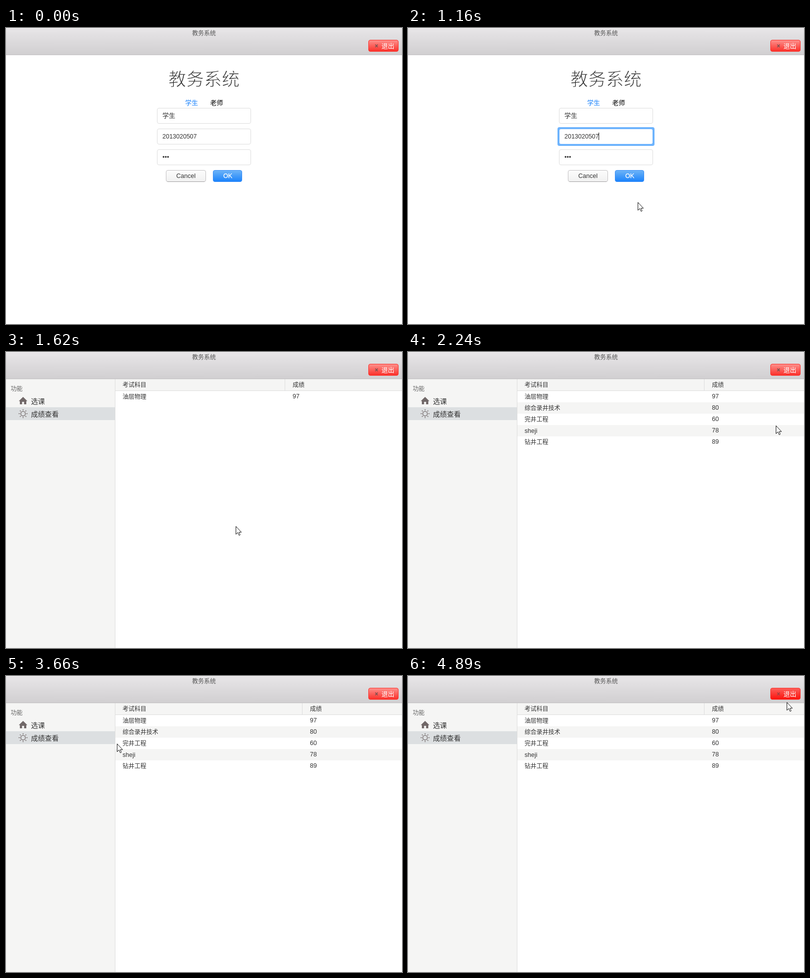
These frames come from a looping animation (800 px wide and 600 px high, 4970 ms). An HTML page:

```html
<!DOCTYPE html>
<html lang="zh-CN">
<head>
<meta charset="utf-8">
<style>
  html, body { margin: 0; width: 100%; height: 100%; overflow: hidden; background: #fff; }
  svg { display: block; width: 800px; height: 600px; }
  text { font-family: "Liberation Sans", "Noto Sans CJK SC", "Noto Sans CJK", sans-serif; font-size: 12px; fill: #333; }
  .medium { font-size: 13px; }
  .large { font-size: 14px; }
  .latin { font-size: 12.5px; }
  .white { fill: #fff; }
  .title { font-size: 36px; stroke: #fff; stroke-width: 1.1px; }
  .line { fill: none; stroke: #ddd; }
  .icon { fill: #716868; }
  .sun { fill: none; stroke: #716868; stroke-width: 1.4; }
</style>
</head>
<body>
<svg viewBox="0 0 800 600">
  <defs id="gradients"></defs>

  <g id="header">
    <rect width="800" height="54" fill="url(#bar)"/>
    <rect width="800" height="1" fill="#f5f4f5"/>
    <rect y="54" width="800" height="1" fill="#c2c0c2"/>
    <text x="400" y="14.5" text-anchor="middle" style="fill:#555">教务系统</text>
    <rect id="exit" x="732.5" y="24.5" width="60" height="23" rx="3.5" stroke="#fb2f29"/>
    <path id="cross" d="M746 33.5l5 5.5m0-5.5l-5 5.5" stroke-width="1.6"/>
    <text x="758.5" y="40.5" class="medium white">退出</text>
  </g>

  <g id="login">
    <text class="title" x="400" y="117" text-anchor="middle">教务系统</text>
    <text class="medium" x="362" y="155.5" style="fill:#1a82fb">学生</text>
    <text class="medium" x="412.5" y="155.5" style="fill:#000">老师</text>
    <g id="fields"></g>
    <g id="focus">
      <rect x="302" y="201" width="196" height="38" rx="4" fill="#6db3fd"/>
      <rect x="306" y="205" width="188" height="30" rx="3" fill="#fff"/>
      <path d="M385.5 212v15" stroke="#000"/>
    </g>
    <text class="medium" x="316" y="182">学生</text>
    <text class="latin" x="316" y="224">2013020507</text>
    <text class="medium" x="316" y="265.5">•••</text>
    <rect x="323.5" y="288.5" width="80" height="23" rx="3.5" fill="url(#plain)" stroke="#c2c0c2"/>
    <path d="M326 311.5h75" stroke="#a19fa1"/>
    <text class="latin" x="344" y="304">Cancel</text>
    <rect id="ok" x="418.5" y="288.5" width="58" height="23" rx="3.5" stroke="#388df8"/>
    <text class="latin white" x="439" y="304" stroke="#fff" stroke-width=".3">OK</text>
  </g>

  <g id="grades">
    <path d="M0 55h220v545H0zM221 55h579v23H221z" fill="#f5f5f4"/>
    <rect y="112" width="220" height="26" fill="#dcdfe1"/>
    <path class="line" d="M220.5 55v545M221 78.5h579"/>
    <text x="9.5" y="78.5" style="fill:#666">功能</text>
    <path class="icon" d="M34.5 91l8.7 8.5H41v6.5h-4.5v-5h-4v5H28v-6.5h-2.2z"/>
    <g class="sun" id="sun"><circle cx="34.5" cy="125" r="4.6"/></g>
    <text class="large" x="50.5" y="104.5">选课</text>
    <text class="large" x="50.5" y="130.5">成绩查看</text>
    <text x="235.5" y="70.5">考试科目</text>
    <g id="rows"></g>
    <g id="scores">
      <path class="line" d="M-15.5 55v23"/>
      <text y="70.5">成绩</text>
    </g>
  </g>

  <path id="cursor" d="M.5.5v16l3.7-3.6 2.5 5.6q1.6.4 2.4-1l-2.4-5.2h4.8z" fill="#fff" stroke="#111" stroke-linejoin="round"/>
</svg>
<script>
const LOOP = 4970, PRESS_OK = 850, RELEASE_OK = 1000, LOGIN_DONE = 1310,
      PAGE_OPEN = 1620, DATA_LOADED = 1700, PRESS_EXIT = 4800;
const TICK = 78; // cursor refresh interval, ms

const el = id => document.getElementById(id);
const show = (node, on) => node.style.display = on ? '' : 'none';

const gradients = {
  bar: ['#e8e6e8', '#d1cfd1'],
  plain: ['#fcfcfc', '#f1f1f1'],
  blue: ['#6eb4f7', '#1a82fb'],
  blueDown: ['#3e9bf4', '#0469de'],
  red: ['#fd918d', '#fb2f29'],
  redDown: ['#fc605b', '#fb120c'],
};
for (const [id, [top, bottom]] of Object.entries(gradients))
  el('gradients').innerHTML += `<linearGradient id="${id}" x2="0" y2="1">
    <stop stop-color="${top}"/><stop offset="1" stop-color="${bottom}"/></linearGradient>`;

for (let i = 0; i < 3; i++)
  el('fields').innerHTML += `<rect class="line" x="305.5" y="${162.5 + 42 * i}" width="189" height="31" rx="3.5"/>`;

for (let a = 0; a < 360; a += 45)
  el('sun').innerHTML += `<path d="M34.5 116v2.4" transform="rotate(${a} 34.5 125)"/>`;

const grades = { 油层物理: 97, 综合录井技术: 80, 完井工程: 60, sheji: 78, 钻井工程: 89 };
Object.entries(grades).forEach(([name, score], i) => {
  const y = 79 + 23 * i;
  const style = /^\w+$/.test(name) ? 'latin' : '';
  const stripe = i % 2 ? `<rect x="221" y="${y}" width="579" height="23" fill="#f5f5f4"/>` : '';
  el('rows').innerHTML += `<g>${stripe}<text class="${style}" x="235.5" y="${y + 15.5}">${name}</text></g>`;
  el('scores').innerHTML += `<text class="latin" y="${y + 15}">${score}</text>`;
});

// Each move starts where the previous one ended; sag bends its path downwards
const entry = { x: 634, y: 554 };
const moves = [
  { from: 140, to: 610, x: 454, y: 303 },
  { from: 680, to: 680, x: 454, y: 299 },
  { from: 1000, to: 1160, x: 464, y: 353 },
  { from: 1850, to: 2240, x: 743, y: 149, sag: 410 },
  { from: 2640, to: 2870, x: 776, y: 39 },
  { from: 3330, to: 3660, x: 224, y: 137 },
  { from: 3710, to: 3790, x: 535, y: 178 },
  { from: 3870, to: 4330, x: 763, y: 26, sag: 30 },
  { from: 4560, to: 4650, x: 763, y: 31 },
  { from: 4890, to: 4890, x: 765, y: 53 },
];

function cursorAt(t) {
  const index = moves.findLastIndex(m => m.from <= t);
  const start = moves[index - 1] || entry, end = moves[index];
  const { from, to, sag = 0 } = end;
  const last = Math.round((to - from) / TICK);
  const step = last && Math.min(last, Math.floor((t - from) / (to - from) * last));
  const u = (step + 1) / (last + 1);
  const mix = (a, b) => a + (b - a) * u;
  return [mix(start.x, end.x), mix(start.y, end.y) + 2 * u * (1 - u) * sag].map(Math.round);
}

function draw() {
  const t = performance.now() % LOOP;
  const loaded = t >= DATA_LOADED, exiting = t >= PRESS_EXIT;
  show(el('login'), t < LOGIN_DONE);
  show(el('header'), t < LOGIN_DONE || t >= PAGE_OPEN);
  show(el('grades'), t >= PAGE_OPEN);
  show(el('focus'), t >= RELEASE_OK);
  el('ok').setAttribute('fill', t >= PRESS_OK && t < RELEASE_OK ? 'url(#blueDown)' : 'url(#blue)');
  el('exit').setAttribute('fill', exiting ? 'url(#redDown)' : 'url(#red)');
  el('cross').setAttribute('stroke', exiting ? '#a04040' : '#7a5050');

  [...el('rows').children].forEach((row, i) => show(row, loaded || i < 1));
  [...el('scores').children].forEach((cell, i) => show(cell, loaded || i < 3));
  el('scores').setAttribute('transform', `translate(${loaded ? 614 : 579})`);

  const visible = t >= moves[0].from;
  show(el('cursor'), visible);
  if (visible) el('cursor').setAttribute('transform', `translate(${cursorAt(t)})`);
  requestAnimationFrame(draw);
}
draw();
</script>
</body>
</html>
```
